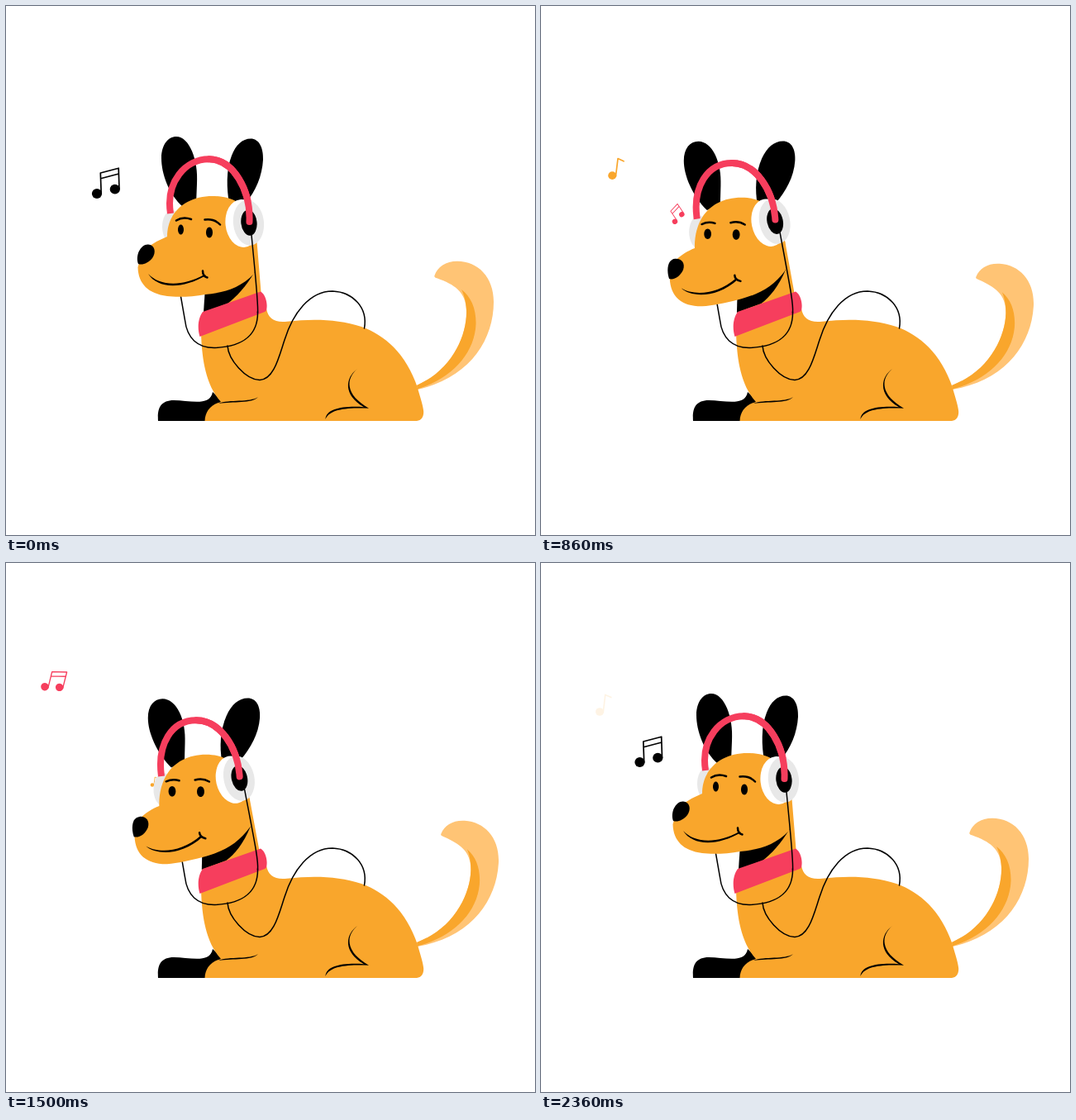
An HTML page for the animation above (2430 ms loop, 640 px wide and 640 px high).

```html
<!DOCTYPE html>
<html lang="en">
<head>
<meta charset="utf-8">
<title>Dog listening to music</title>
<style>
  html, body { margin: 0; width: 100%; height: 100%; overflow: hidden; background: #fff; }
  svg { display: block; width: 100vw; height: 100vh; }
  .line { fill: none; stroke: #000; stroke-width: 1.5; stroke-linecap: round; }
  .fur { fill: #f9a62c; }
  .pink { fill: #f63e5d; }
  .band { fill: none; stroke: #f63e5d; stroke-width: 8; }
  .brow { fill: none; stroke: #000; stroke-width: 2.5; stroke-linecap: round; stroke-linejoin: round; }
  .note { stroke-linejoin: round; stroke-linecap: round; }
  .note path { fill: none; stroke: currentColor; stroke-width: 1.7; }
  .note ellipse { fill: currentColor; stroke: none; }
</style>
</head>
<body>
<svg viewBox="0 0 640 640" xmlns="http://www.w3.org/2000/svg">
  <defs>
    <g id="pair">
      <ellipse rx="6.1" ry="5.9"/><ellipse cx="21.8" cy="-5.3" rx="6.1" ry="5.9"/>
      <path d="M5.2,0 L4.3,-25 L26.2,-30.8 L27,-5.5 M4.6,-18.2 L26.4,-24"/>
    </g>
    <g id="single">
      <ellipse rx="5" ry="4.8"/>
      <path d="M4.2,1 L6.8,-20.6 L13.8,-17.4"/>
    </g>
  </defs>
  <g id="notes"></g>

  <g id="tail">
    <path fill="#ffc475" d="M518.5,326 C522,315.5 532,308.7 546,308.7 C571,308.7 590,328 590,358 C590,405 560,450 498,464 L497,459 C540,440 558,398 557,368 C556,345 542,337 522,329.5 C519,328.5 517.8,328 518.5,326Z"/>
    <path class="fur" d="M551,343 C563,352 569,367 568.5,385 C567,420 540,450 498,463.5 L497,459 C540,440 558,398 557,368 C556.5,357 554,349 551,343Z"/>
  </g>

  <path d="M184,502 C183,488 186,477 203,477 C222,477 247,485 250,467 L264,480 L244,502Z"/>
  <path class="fur" d="M236,396 C237,425 241,458 260,479 C248,482 241,490 240.5,502 H497 C503,501.5 506,496 505,489 C504,481 500,470 498,462 C484,420 458,398 430,388 C402,379 372,378 340,381.8 C325,383.5 317,378 315,366 L303,345 L237,372Z"/>
  <path d="M257,481 C270,475.5 295,480 305,473 C297,481.5 275,478 257,481Z"/>
  <path d="M425,439 C411,451 410,470 439,486.7 C414,486 392,487 386.5,500 C387,487 408,483.5 433,485.2 C408,471 410,450 425,439Z"/>
  <path class="line" d="M268,411 C269,428 290,452 307,452.5 C324,452 330,425 337,404 C347,372 367,345 395,345 C420,346 438,365 433.5,390"/>

  <g id="back"></g>
  <path class="pink" d="M238,370 L308,345.5 C314,349 317,360 315,368 Q315,369 313,370 L234.5,400 C231.5,391 232,378 238,370Z"/>
  <path class="line" d="M210,343 L216.5,380 C219,402 232,414 253,413.5 C290,412 305,395 304.5,370"/>
  <g id="front"></g>
  <g id="cup">
    <ellipse rx="20.5" ry="29" fill="#fff"/>
    <ellipse cx="7.5" rx="18.5" ry="27.5" fill="#e8e8e8"/>
    <ellipse cx="8" rx="9.6" ry="15.6"/>
  </g>
  <g id="top"></g>
</svg>
<script>
const NS = 'http://www.w3.org/2000/svg';
const $ = id => document.getElementById(id);
const FPS = 14, FRAMES = 34, LOOP = 2430;

function add(parent, tag, attrs) {
  const el = document.createElementNS(NS, tag);
  for (const key in attrs) el.setAttribute(key, attrs[key]);
  return $(parent).appendChild(el);
}

// Parts that blend between head raised and head lowered
const morphs = [];
function morph(parent, cls, up, down) {
  const el = add(parent, 'path', { class: cls });
  morphs.push({ el, up, down: down.match(/-?[\d.]+/g).map(Number) });
  return el;
}
const oval = (x, y, rx, ry) =>
  `M${x - rx},${y} C${x - rx},${y - ry * .552} ${x - rx * .552},${y - ry} ${x},${y - ry}` +
  ` C${x + rx * .552},${y - ry} ${x + rx},${y - ry * .552} ${x + rx},${y}` +
  ` C${x + rx},${y + ry * .552} ${x + rx * .552},${y + ry} ${x},${y + ry}` +
  ` C${x - rx * .552},${y + ry} ${x - rx},${y + ry * .552} ${x - rx},${y}Z`;

morph('back', '',
  'M206,158 C222,158 233,187 231,215 L230,240 L214,243 C197,228 188,203 188,184 C188,168 196,158 206,158Z',
  'M187,165 C204,165 216,190 214.5,218 L214,240 L198,248 C180,230 169.5,205 169.5,188 C169.5,173 177,165 187,165Z');
const farEar = morph('back', '',
  'M296,160.5 C306,160.5 311.5,171 311,186 C310,205 302,225 290,238 L270,238 C267,222 266,198 273,181 C278,168 286,160.5 296,160.5Z',
  'M292,164 C302,164 307.5,173 306.5,188 C305,207 295,224 283,238 L260,240 C257,223 258,203 266,185 C272,172 281,164 292,164Z');
morph('back', '', oval(201, 267, 12, 20), oval(189, 275, 12, 20)).style.fill = '#e8e8e8';
morph('back', 'band',
  'M199,251 C193,213 217,185 246,185.3 C275,186 296,222 294.5,261',
  'M186.5,259 C181,220 198,191 228,191 C256,191 278,222 281,258');
morph('back', 'fur', 'M245,330 L250,260 L303.5,285 L309,352 L239,373Z',
  'M240,330 L240,260 L293.5,285 L307,352 L237,373Z');
morph('back', '',
  'M241,340 L239,371 L268,360 C278,352.5 291,339 300.5,322 L285,320Z',
  'M237,345 L236.5,371 L266,360 C276,353 287,339 295,318.5 L278,320Z');

morph('front', 'fur',
  'M195,279 C195,250 217,230 250,230 C280,230 300,245 303,285 L300,324 C283,342 262,347 241,349 C225,352 206,352.5 195,351 C172,348 160,336 159.5,316 L165,298 C172,290 183,284 195,279Z',
  'M184,296 C183,258 204,232 241,232 C268,232 288,248 293.5,285 L294.5,319 C280,340 262,350 237,357 C222,361 208,365 195,366 C170,367 156,355 155,333 L160,312 C168,304 176,299 184,296Z');
morph('front', '',
  'M160,312 C156,302 163,288 172,288.5 C180,289 182,298 177,305 C172,311 165,314 160,312Z',
  'M154,334 C151,325 150,311 160,309.5 C168,308.5 173,314 171,322 C168,330 161,335.5 154,334Z');
morph('front', '', oval(211.5, 270.5, 3.5, 6), oval(199.5, 277, 4.5, 6.3));
morph('front', '', oval(246, 274, 4, 6.5), oval(234, 277, 4.5, 6.3));
morph('front', 'brow', 'M206,259.5 Q214,254.5 224,258', 'M192,265 Q200,261.5 207.5,264');
morph('front', 'brow', 'M240.5,258.5 Q252,257 259,264.5', 'M227,263 Q236,260 244,264.5');
morph('front', '',
  'M172,324 C183,342 213,343 242,326 L240,325 C213,340 186,339 172,324Z',
  'M169,345 C181,355 213,356 237,332 L235,330.5 C212,352 184,353 169,345Z');
morph('front', 'brow', 'M238,320.5 Q238,327 243.5,328.5', 'M233.5,327 Q234,332.5 241,333.8');

morph('top', 'line', 'M304.5,371 C305.5,362 303,340 297,277', 'M304.5,371 C305.5,360 301,340 287.5,274');
morph('top', 'band', 'M246,185.3 C275,186 296,222 294.5,261',
  'M228,191 C256,191 278,222 281,258').style.strokeLinecap = 'round';

// Each key is [age, x, y]; ages and starts count in frames
const paths = {
  black: [[0, 192, 268], [4, 154, 264], [7.3, 119.5, 241], [8.3, 110, 227], [12.3, 85, 169], [13.3, 81, 151]],
  amber: [[0, 197, 269], [1.7, 177, 268.5], [3.4, 157, 267.5], [5.7, 131, 256], [8.4, 107, 236.5], [13.7, 71, 180]],
  red: [[0, 197, 268], [5.5, 121, 244], [11.5, 47, 149.7], [13.5, 36, 125]]
};
const LIFE = 13.94, GROW = 3.7, FADE = 2;
const notes = [
  { start: 25.7, path: paths.black, shape: 'pair', color: '#000', size: 1, turn: () => 0 },
  { start: .6, path: paths.amber, shape: 'single', color: '#f9a62c', size: 1, turn: () => 0 },
  { start: 19.3, path: paths.amber, shape: 'single', color: '#f9a62c', size: 1, turn: () => 0 },
  { start: 9.5, path: paths.red, shape: 'pair', color: '#f63e5d', size: .79, turn: age => (age - 8.5) * 5.33 }
];
for (const note of notes) {
  note.el = add('notes', 'g', { class: 'note', color: note.color });
  note.el.appendChild($(note.shape).cloneNode(true)).removeAttribute('id');
}

// Smooth curve through keys
function along(keys, t, axis) {
  const last = keys.length - 1;
  let i = 0;
  while (i < last - 1 && t > keys[i + 1][0]) i++;
  const slope = j => {
    const a = keys[Math.max(0, j - 1)], b = keys[Math.min(last, j + 1)];
    return (b[axis] - a[axis]) / (b[0] - a[0]);
  };
  const a = keys[i], b = keys[i + 1], span = b[0] - a[0], u = (t - a[0]) / span;
  return mix(a[axis], b[axis], smooth(u)) +
    span * u * (1 - u) * (slope(i) * (1 - u) - slope(i + 1) * u);
}

const clamp = v => Math.min(1, Math.max(0, v));
const smooth = v => v * v * (3 - 2 * v);
const mix = (a, b, k) => a + (b - a) * k;

function frameAt(ms) {
  const begin = n => Math.round(n * 100 / FPS) * 10;
  let n = Math.floor(ms * FPS / 1000);
  if (begin(n + 1) <= ms) n++;
  if (begin(n) > ms) n--;
  return Math.min(n, FRAMES - 1);
}

function draw(ms) {
  const n = frameAt(ms);

  const nod = smooth(n < 17 ? n / 17 : clamp((33 - n) / 16)) / .962;
  for (const { el, up, down } of morphs) {
    let i = 0;
    el.setAttribute('d', up.replace(/-?[\d.]+/g, v => mix(+v, down[i++], nod).toFixed(2)));
  }
  const flick = n < 12 ? 2.2 * Math.sin(Math.PI * n / 12) : 0;
  farEar.setAttribute('transform', `translate(${flick} 0)`);
  $('cup').setAttribute('transform',
    `translate(${mix(286, 273, nod)} ${mix(263, 262, nod)}) rotate(${mix(-6, -13, nod)})`);

  const wag = (1 - Math.cos(2 * Math.PI * n / 16.5)) / 2;
  $('tail').setAttribute('transform', `rotate(${5.9 * wag} 498 461)`);

  for (const { el, start, path, size, turn } of notes) {
    const age = (n - start + FRAMES) % FRAMES;
    const shown = age < LIFE;
    el.style.display = shown ? '' : 'none';
    if (!shown) continue;
    el.setAttribute('transform', `translate(${along(path, age, 1)} ${along(path, age, 2)})` +
      ` rotate(${turn(age)}) scale(${size * clamp(age / GROW)})`);
    el.setAttribute('opacity', clamp((LIFE - age) / FADE));
  }
}

const origin = performance.now();
function tick() {
  draw((performance.now() - origin) % LOOP);
  requestAnimationFrame(tick);
}
tick();
</script>
</body>
</html>
```
